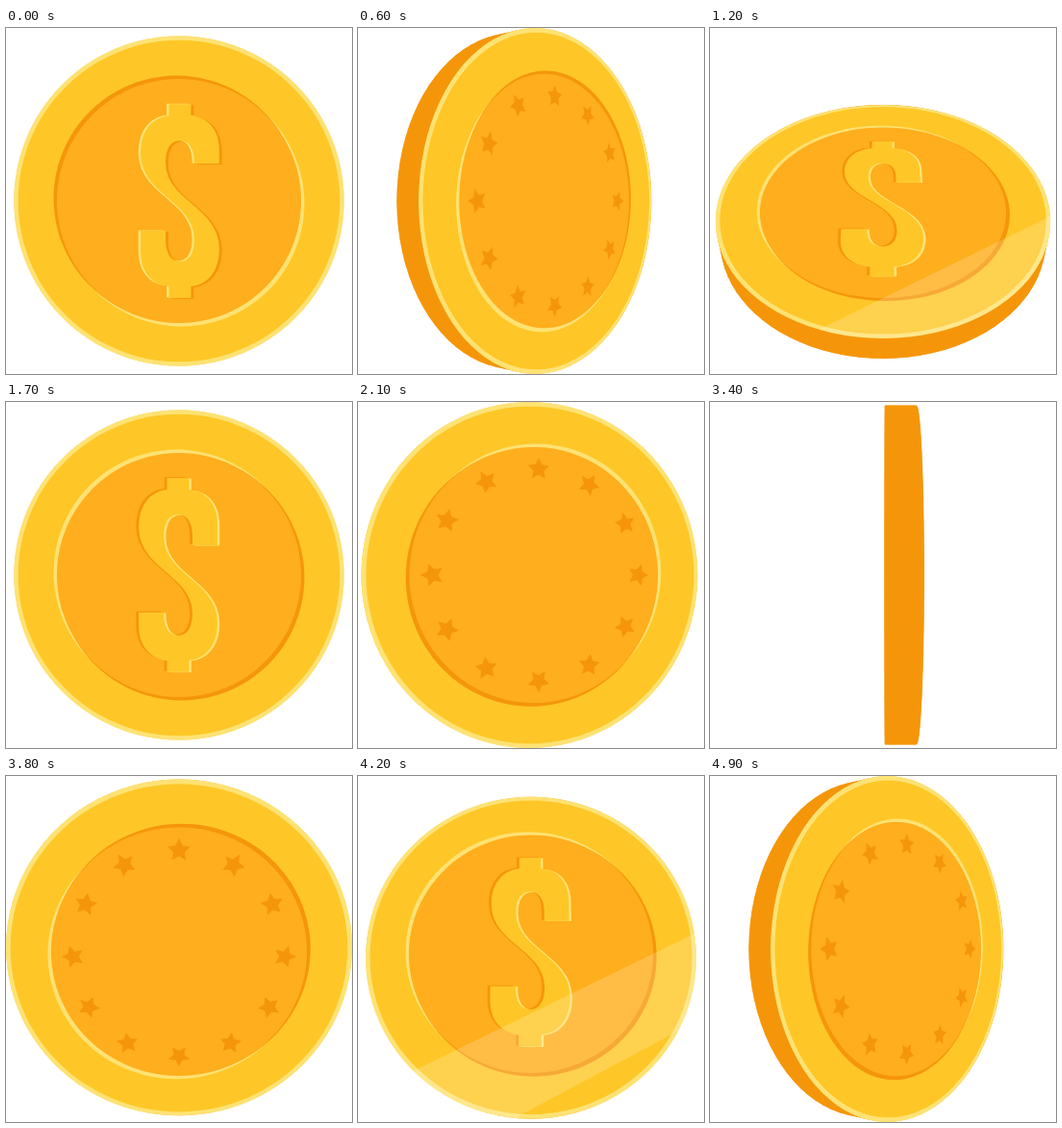
Recreate the animation shown at these times as an HTML page with a canvas. Size 360 by 360 pixels, loop 5000 ms.

```html
<!DOCTYPE html>
<html lang="en">
<head>
<meta charset="utf-8">
<title>Spinning coin</title>
<style>
  html, body { margin: 0; width: 100%; height: 100%; overflow: hidden; background: #fff; }
  canvas { display: block; width: 360px; height: 360px; }
</style>
</head>
<body>
<canvas id="stage" width="360" height="360"></canvas>
<script>
const ctx = document.getElementById('stage').getContext('2d');
const { PI, sin, cos } = Math;

const LOOP = 5000, STEP = 100;
const RADIUS = 172.2, EYE = 760, MID = 180;
const FRONT = -2, BACK = -33;
const GOLD = '#fec727', AMBER = '#ffae1d', DARK = '#f5960a', PALE = '#fee274';

const ease = u => {
  u = Math.min(1, Math.max(0, u));
  return u * u * (3 - 2 * u);
};

function circle(r, dx = 0, dy = 0, n = 96) {
  return Array.from({ length: n }, (_, i) => {
    const a = i / n * 2 * PI;
    return [dx + r * cos(a), dy + r * sin(a)];
  });
}

function star(angle, dist, r) {
  const cx = dist * cos(angle), cy = dist * sin(angle);
  return Array.from({ length: 10 }, (_, i) => {
    const k = i % 2 ? r * 0.5 : r, a = angle + i * PI / 5;
    return [cx + k * cos(a), cy + k * sin(a)];
  });
}

// Upper half of the dollar sign; the lower half is the same, turned by 180 degrees.
function dollarHalf(tip, sign) {
  const pts = [[15, tip], [41, tip], [41, -52]];
  const curve = (x1, y1, x2, y2, x3, y3) => {
    const [x0, y0] = pts[pts.length - 1];
    for (let i = 1; i <= 14; i++) {
      const t = i / 14, u = 1 - t;
      const mix = (a, b, c, d) => u * u * u * a + 3 * u * u * t * b + 3 * u * t * t * c + t * t * t * d;
      pts.push([mix(x0, x1, x2, x3), mix(y0, y1, y2, y3)]);
    }
  };
  curve(41, -74, 30, -87, 11.5, -89);
  pts.push([11.5, -101], [-11.5, -101], [-11.5, -89]);
  curve(-30, -87, -41, -72, -41, -50);
  curve(-41, -6, 15, 0, 15, 40);
  curve(15, 57, 8, 63, 0, 63);
  curve(-8, 63, -15, 57, -15, 40);
  return pts.map(([x, y]) => [x * sign + 1, y * sign]);
}

const dollar = [...dollarHalf(-39, 1), ...dollarHalf(-31, -1)];
const stars = Array.from({ length: 12 }, (_, i) => star(i * PI / 6, 105.5, 11.5));
const rim = circle(RADIUS);
const side = circle(RADIUS - 0.7);
const shift = (pts, dx, dy) => pts.map(([x, y]) => [x + dx, y + dy]);

// Yaw, then pitch, then perspective; odd half turns start upside down.
function makeView(yaw, pitch, turned) {
  const cy = cos(yaw), sy = sin(yaw), cp = cos(pitch), sp = sin(pitch);
  const k = turned ? -1 : 1;
  const project = (px, py, z) => {
    const x = px * k, y = py * k;
    const depth = x * sy + z * cy;
    const scale = EYE / (EYE - (depth * cp - y * sp));
    return [MID + (x * cy - z * sy) * scale, MID + (y * cp + depth * sp) * scale];
  };
  return { project, facing: cy * cp };
}

function trace(pts) {
  ctx.beginPath();
  pts.forEach(([x, y]) => ctx.lineTo(x, y));
  ctx.closePath();
}

function fill(pts, color) {
  trace(pts);
  ctx.fillStyle = color;
  ctx.fill();
}

function drawEdge(project) {
  const front = side.map(p => project(p[0], p[1], FRONT));
  const back = side.map(p => project(p[0], p[1], BACK));
  ctx.strokeStyle = DARK;
  ctx.lineWidth = 0.6;
  fill(front, DARK);
  fill(back, DARK);
  front.forEach((p, i) => {
    const j = (i + 1) % front.length;
    fill([p, front[j], back[j], back[i]], DARK);
    ctx.stroke();
  });
}

function drawFace(project, z, isDollar) {
  const put = (pts, color) => fill(pts.map(p => project(p[0], p[1], z)), color);
  put(rim, PALE);
  put(circle(RADIUS - 4.4), GOLD);
  put(circle(128.2, 2.6, 2.6), PALE);
  put(circle(128.2, -2.6, -2.6), DARK);
  put(circle(127.4), AMBER);
  if (isDollar) {
    put(shift(dollar, 2.8, 1), DARK);
    put(shift(dollar, -2.4, -0.5), PALE);
    put(dollar, GOLD);
  } else {
    stars.forEach(s => put(s, DARK));
  }
}

// Slanted band of light, given by its height at the middle of the stage.
function drawShine(project, phase) {
  let y, alpha = 0.18;
  if (phase >= 11 && phase < 17) {
    y = 281 - 34 * (phase - 12);
    alpha *= Math.min(1, (17 - phase) / 4);
  } else if (phase >= 26 && phase < 29) {
    y = 335 + 34 * (phase - 28);
  } else return;
  ctx.save();
  trace(rim.map(p => project(p[0], p[1], FRONT)));
  ctx.clip();
  fill([[0, y + 88], [360, y - 88], [360, y + 4], [0, y + 196]], `rgba(255,255,255,${alpha})`);
  ctx.restore();
}

function draw(time) {
  const tick = Math.floor(time % LOOP / STEP);
  // The beat skips ahead once in each flip to stars on the second half.
  const beat = tick + (tick >= 19) + (tick >= 47);
  const phase = beat % 30, turned = phase >= 15, q = phase % 15;
  const yaw = PI * ease((q - 2) / 6);
  const pitch = PI * ease((q - 8) / 6) * (turned ? -1 : 1);
  const { project, facing } = makeView(yaw, pitch, turned);

  ctx.fillStyle = '#fff';
  ctx.fillRect(0, 0, 360, 360);
  drawEdge(project);
  if (facing > 1e-6) {
    drawFace(project, FRONT, true);
    drawShine(project, phase);
  } else if (facing < BACK / EYE) {
    drawFace(project, BACK, false);
  }
}

const start = performance.now();
function loop() {
  draw(performance.now() - start);
  requestAnimationFrame(loop);
}
loop();
</script>
</body>
</html>
```
